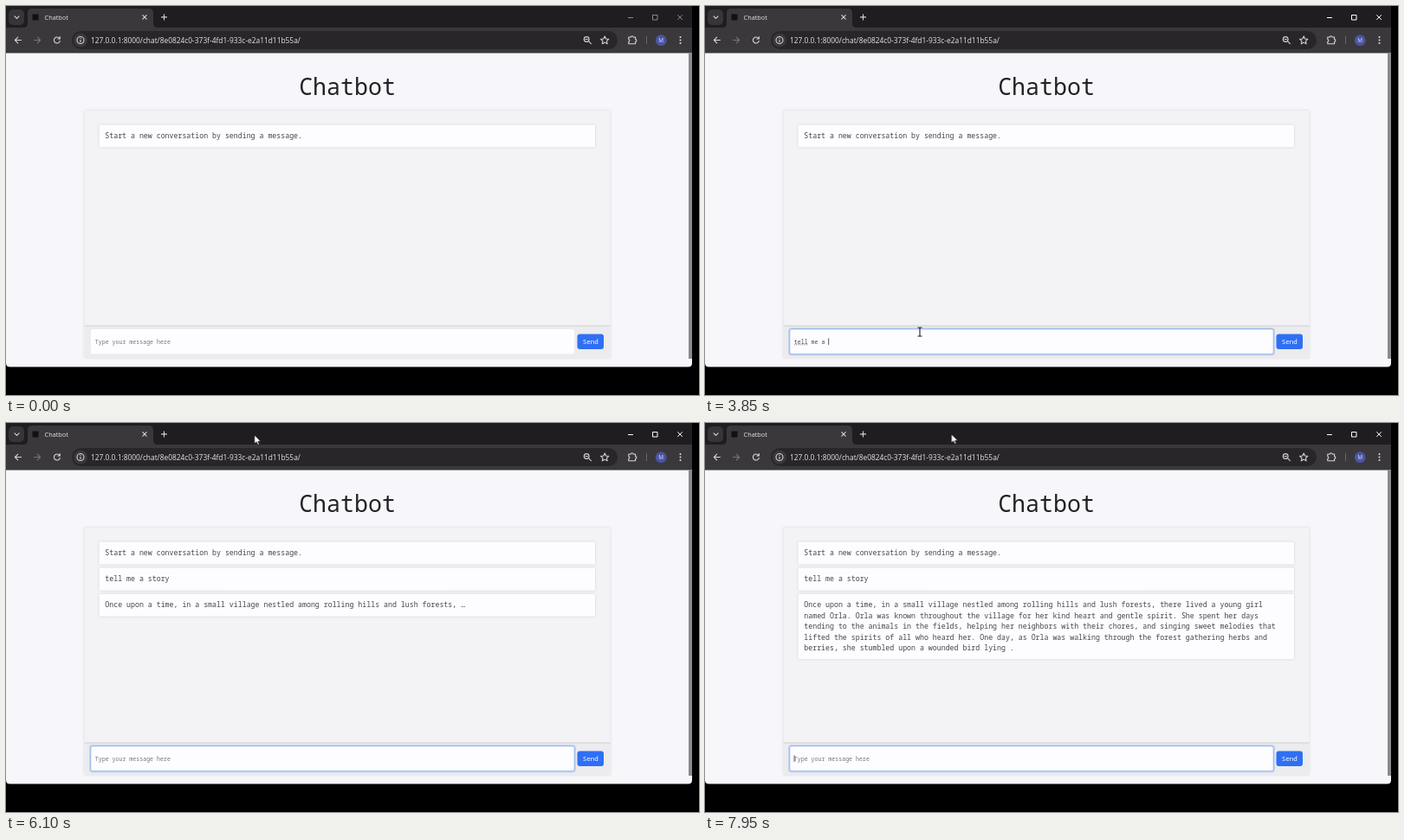
An HTML page that plays this animation: 800x450 px, repeating every 8 s.

```html
<!DOCTYPE html>
<html lang="en">
<head>
<meta charset="utf-8">
<title>Chatbot</title>
<style>
  html, body { margin: 0; width: 100%; height: 100%; overflow: hidden; background: #000; }
  svg { display: block; width: 800px; height: 450px; }
  text { white-space: pre; font-family: "Noto Sans Mono", "DejaVu Sans Mono", monospace; }
  .ui { font-family: "Open Sans", "Noto Sans", sans-serif; fill: #e6e4e7; }
  .msg { font-size: 8.25px; fill: #454547; }
  .input { font-size: 6.6px; }
  .line { fill: none; stroke: #d6d4d7; stroke-width: 1.1; stroke-linecap: round; stroke-linejoin: round; }
  .card { fill: #fdfcfe; filter: drop-shadow(0 .8px .9px rgba(0, 0, 0, .16)); }
  .panel { filter: drop-shadow(0 .8px 1.6px rgba(0, 0, 0, .14)); }

  .buttons, .ring, .mouse, .arrow, .beam { animation: 8s infinite; }
  .buttons { fill: none; stroke-width: 1; animation-name: wake; animation-timing-function: step-end; }
  .ring { opacity: 0; animation-name: focus; }
  .mouse { animation-name: move; animation-timing-function: linear; }
  .arrow, .beam { opacity: 0; animation-timing-function: step-end; }
  .arrow { animation-name: arrow; }
  .beam { animation-name: beam; }

  @keyframes wake { 0% { stroke: #8b898c; } 8.75%, 100% { stroke: #fff; } }
  @keyframes focus { 0%, 15.3% { opacity: 0; } 17.9%, 100% { opacity: 1; } }
  @keyframes arrow { 0% { opacity: 0; } 10.625% { opacity: 1; } 13.5% { opacity: 0; } 64%, 100% { opacity: 1; } }
  @keyframes beam { 0% { opacity: 0; } 13.5% { opacity: 1; } 64%, 100% { opacity: 0; } }
  @keyframes move {
    0%, 10.625% { transform: translate(335px, 299px); animation-timing-function: ease-out; }
    13.75%, 63.5% { transform: translate(248px, 377px); }
    65.6% { transform: translate(262px, 250px); }
    67.5% { transform: translate(285px, 60px); }
    69% { transform: translate(292px, 1px); }
    72% { transform: translate(290px, 6px); }
    76.25% { transform: translate(286.8px, 14px); }
    80.5%, 100% { transform: translate(284.5px, 13px); }
  }
</style>
</head>
<body>
<svg viewBox="0 0 800 450">
  <!-- window -->
  <path d="M0 0H792V413q0 4.500-4.500 4.500H4.500Q0 417.500 0 413Z" fill="#f7f6fa"/>
  <rect width="792" height="26" fill="#1f1d20"/>
  <rect y="25" width="792" height="29.500" fill="#3a383b"/>
  <path d="M20 25q5 0 5-5V8q0-5 5-5H165q5 0 5 5V20q0 5 5 5Z" fill="#3a383b"/>
  <rect x="3" y="4" width="18" height="18" rx="5" fill="#373538"/>
  <path class="line" d="M10 11.800l2.500 2.500 2.500-2.500"/>
  <rect x="30.500" y="9.500" width="7" height="7" fill="#111"/>
  <text class="ui" x="44.600" y="15.800" font-size="7.300">Chatbot</text>
  <path class="line" d="M157.800 10.700l4.400 4.400m0-4.400l-4.400 4.400M179.500 12.900h6m-3-3v6"/>
  <path class="buttons" d="M718 13.500h6M746.500 10.500h5.500v5.500h-5.500ZM775.300 10.300l5.600 5.600m0-5.600l-5.600 5.600"/>

  <!-- toolbar -->
  <path class="line" d="M17.500 39.500h-7m3.200-3.300l-3.300 3.300 3.300 3.300"/>
  <path class="line" style="stroke:#77757a" d="M32.500 39.500h7m-3.200-3.300l3.300 3.300-3.300 3.300"/>
  <path class="line" d="M61.800 37.500a3.500 3.500 0 1 0 .5 3M62.300 35.600v2.400h-2.400"/>
  <rect x="76" y="29" width="630" height="21" rx="10.500" fill="#282629"/>
  <circle cx="86" cy="39.500" r="8" fill="#3a383b"/>
  <circle class="line" cx="86" cy="39.500" r="4"/>
  <path class="line" d="M86 39.300v2.200M86 37.400v.1"/>
  <text class="ui" x="98" y="42.700" font-size="8.400">127.0.0.1:8000/chat/8e0824c0-373f-4fd1-933c-e2a11d11b55a/</text>
  <circle class="line" cx="670.200" cy="38.500" r="2.900"/>
  <path class="line" d="M672.400 40.700l3 3M669 38.500h2.400"/>
  <path class="line" d="M691.200 35l1.400 3 3.200.4-2.400 2.200.7 3.200-2.900-1.700-2.900 1.700.7-3.200-2.400-2.200 3.200-.4Z"/>
  <path class="line" d="M718.800 36h2.600a1.300 1.300 0 0 1 2.600 0h2.600v2.600a1.300 1.300 0 0 1 0 2.600v2.600h-7.800v-2.500a1.400 1.400 0 0 0 0-2.700Z"/>
  <path d="M739.500 35v9" stroke="#69676b"/>
  <circle cx="756.200" cy="39.700" r="6.400" fill="#4a55a5"/>
  <text class="ui" x="756.200" y="42" font-size="6.400" text-anchor="middle">M</text>
  <g fill="#e0dee1"><circle cx="778.500" cy="36" r="1"/><circle cx="778.500" cy="39.500" r="1"/><circle cx="778.500" cy="43" r="1"/></g>

  <!-- page -->
  <rect x="788" y="54.500" width="4" height="353.500" fill="#8a898b"/>
  <text x="394" y="102.500" font-size="26.600" font-weight="300" text-anchor="middle" fill="#222124">Chatbot</text>
  <rect class="panel" x="90.500" y="121" width="607" height="286" fill="#f3f2f4"/>
  <rect x="90.500" y="370" width="607" height="37" fill="#ecebed"/>
  <path d="M90.500 370h607" stroke="#cfced0"/>
  <g id="messages"></g>

  <!-- message form -->
  <rect x="98" y="374" width="558" height="28.500" rx="2" fill="#fdfcfe"/>
  <g class="ring" fill="none">
    <rect x="97" y="373" width="560" height="30.500" rx="3" stroke="#c5d5f2" stroke-width="2"/>
    <rect x="97.800" y="373.800" width="558.400" height="28.900" rx="2" stroke="#92b5ea" stroke-width=".9"/>
  </g>
  <text id="field" class="input" x="102.800" y="390.500"></text>
  <path id="spell" d="M103 391.800h15.500" stroke="#77757a" stroke-width=".8" stroke-dasharray="1 .8"/>
  <path id="caret" d="M0 384.300v7.700" stroke="#333" stroke-width=".8"/>
  <rect x="659.500" y="379.500" width="30.500" height="17.500" rx="3" fill="#2f6ff5"/>
  <text x="674.800" y="391" font-size="7.500" font-weight="500" text-anchor="middle" fill="#fff">Send</text>

  <g class="mouse">
    <path class="arrow" d="M0 0V10l2.300-2.200 1.500 3.500 1.700-.7-1.500-3.400H7.200Z" fill="#fff" stroke="#111" stroke-width=".6"/>
    <path class="beam" d="M-2.500-5H-.7L0-4.400.7-5H2.500M-2.500 5H-.7L0 4.400.7 5H2.500M0-4.400V4.400" fill="none" stroke="#222" stroke-width="1.100"/>
  </g>
</svg>
<script>
const LOOP = 8000, FOCUS = 1250, SUBMIT = 4450, REPLY = 4700, BLINK = 530;
const COLUMNS = 112, LINE = 12.37, PROMPT = 'tell me a story';
const story = 'Once upon a time, in a small village nestled among rolling hills and lush forests, ' +
  'there lived a young girl named Orla. Orla was known throughout the village for her kind heart ' +
  'and gentle spirit. She spent her days tending to the animals in the fields, helping her neighbors ' +
  'with their chores, and singing sweet melodies that lifted the spirits of all who heard her. ' +
  'One day, as Orla was walking through the forest gathering herbs and berries, ' +
  'she stumbled upon a wounded bird lying';
const tokens = story.match(/[.,]| ?\w+/g);

// [time, key]; '<' is backspace
const keys = [
  [1750, 't'], [1900, 'e'], [2100, 'l'], [2200, 'l'], [2450, ' '],
  [2550, 'm'], [2650, 'e'], [2750, ' '], [3000, 's'], [3300, '<'], [3450, 'a'], [3850, ' '],
  [4000, 's'], [4050, 't'], [4150, 'o'], [4200, 'r'], [4300, 'y']
];
// [time, tokens received]
const stream = [[5600, 0], [6100, 17], [7000, 50], [7400, 62], [7950, tokens.length]];

const $ = id => document.getElementById(id);
const show = (el, on) => el.setAttribute('visibility', on ? 'visible' : 'hidden');

function received(t) {
  let [t0, n0] = stream[0];
  for (const [t1, n1] of stream) {
    if (t < t1) return Math.floor(n0 + (n1 - n0) * Math.max(0, t - t0) / (t1 - t0 || 1) + 1e-6);
    [t0, n0] = [t1, n1];
  }
  return n0;
}

function wrap(text) {
  const lines = [''];
  for (const word of text.split(' ')) {
    const last = lines[lines.length - 1];
    const next = last ? last + ' ' + word : word;
    if (next.length > COLUMNS) lines.push(word);
    else lines[lines.length - 1] = next;
  }
  return lines;
}

function card(lines, i) {
  const y = 137.4 + i * 30.15;
  const rows = lines.map((s, k) => `<text class="msg" x="114.3" y="${y + 15.7 + k * LINE}">${s}</text>`);
  return `<rect class="card" x="107.5" y="${y}" width="572.5" height="${13.8 + lines.length * LINE}" rx="1"/>` + rows.join('');
}

function reply(t) {
  const text = tokens.slice(0, received(t)).join('');
  const dots = (t - 4850) % 490 < 245 ? '.' : '…';
  return wrap(text ? text + ' ' + dots : dots);
}

let shown = '';
function drawMessages(t) {
  const cards = [['Start a new conversation by sending a message.']];
  if (t >= SUBMIT) cards.push([PROMPT]);
  if (t >= REPLY) cards.push(reply(t));
  const html = cards.map(card).join('');
  if (html !== shown) $('messages').innerHTML = shown = html;
}

function drawField(t) {
  let text = '', last = FOCUS;
  for (const [time, key] of keys) {
    if (t < time) break;
    text = key === '<' ? text.slice(0, -1) : text + key;
    last = time;
  }
  if (t >= SUBMIT) { text = ''; last = SUBMIT; }
  $('field').textContent = text || 'Type your message here';
  $('field').setAttribute('fill', text ? '#4c4b4e' : '#77767a');
  show($('spell'), t >= 2450 && t < SUBMIT);
  $('caret').setAttribute('transform', `translate(${103.1 + text.length * 3.96})`);
  show($('caret'), t >= FOCUS && (t - last) % (2 * BLINK) < BLINK);
}

let start;
function frame(now) {
  start ??= now;
  const t = (now - start) % LOOP;
  drawMessages(t);
  drawField(t);
  requestAnimationFrame(frame);
}
requestAnimationFrame(frame);
</script>
</body>
</html>
```
